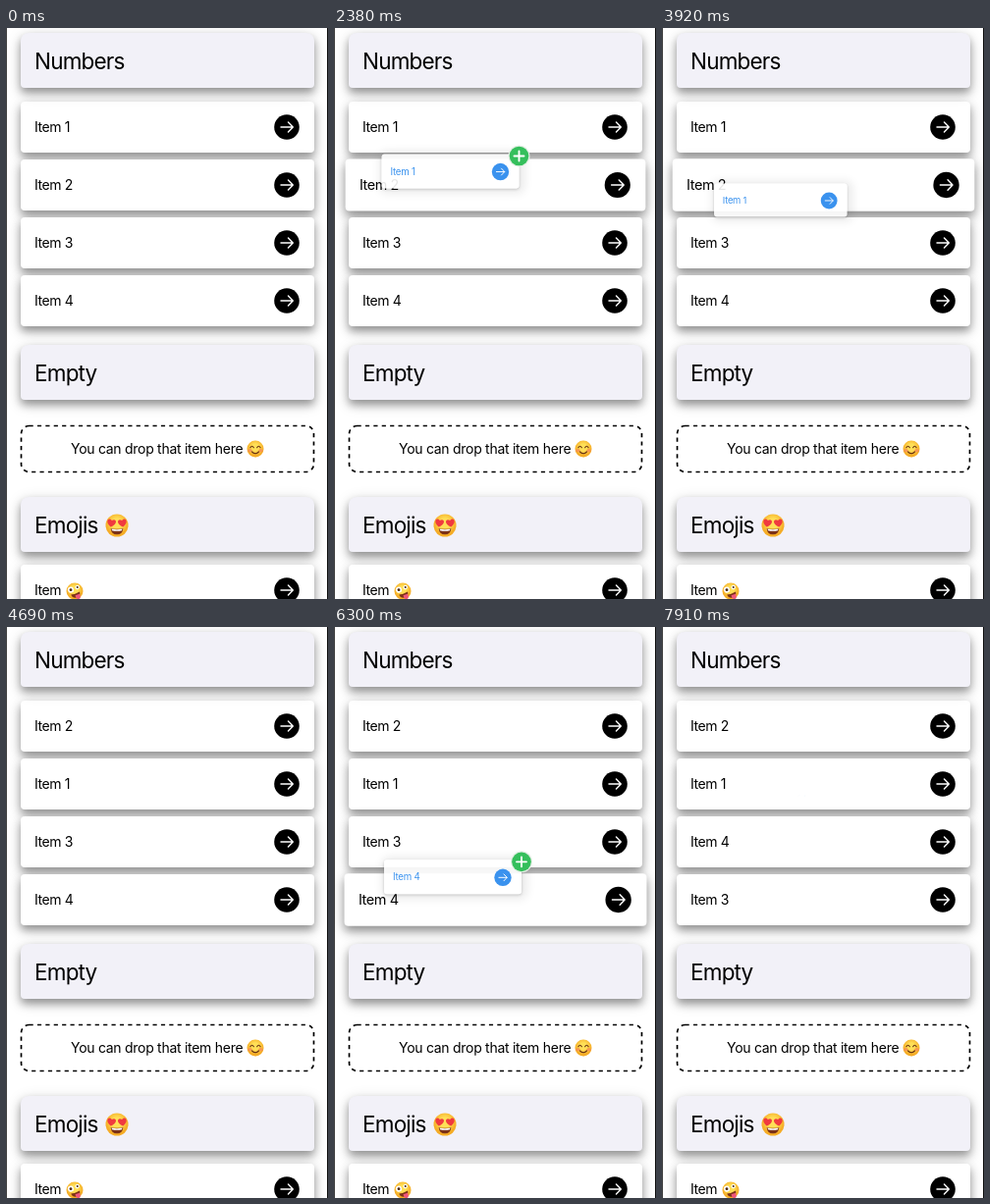
An HTML page for the animation above (8 s loop, 328 px wide and 582 px high).

```html
<!DOCTYPE html>
<html lang="en">
<head>
<meta charset="utf-8">
<title>Drag and drop list</title>
<style>
  html, body { margin: 0; width: 100%; height: 100%; overflow: hidden; background: #fff; }
  #stage { position: relative; width: 328px; height: 582px; overflow: hidden; background: #fff;
    font: 14px/52px Inter, Roboto, sans-serif; letter-spacing: -.4px; color: #000; }
  #stage div { position: absolute; box-sizing: border-box; white-space: pre; }
  svg { position: absolute; overflow: visible; }
  .card { left: 15px; width: 299px; height: 52px; padding-left: 14px; border-radius: 4px; background: #fff;
    box-shadow: 0 5px 9px rgba(0,0,0,.35), 0 4px 16px rgba(0,0,0,.16); }
  .header { height: 56px; border-radius: 8px 8px 4px 4px; background: #f2f1f8;
    font-size: 22.5px; line-height: 58px; letter-spacing: -.8px; }
  #stage .drop { left: 15px; top: 405px; width: 299px; height: 48px; padding-left: 51px;
    line-height: 48px; letter-spacing: -.28px; }
  .preview { width: 140px; height: 35px; padding-left: 9px; border-radius: 3px; background: rgba(255,255,255,.9);
    color: #3a92ee; font-size: 9.7px; line-height: 35px; letter-spacing: -.25px;
    box-shadow: 0 1px 3px rgba(0,0,0,.2), 2px 1px 10px 4px rgba(0,0,0,.08); }
  .edge { top: 0; width: 1px; height: 582px; background: #444; }
</style>
</head>
<body>
<div id="stage"></div>
<script>
const stage = document.getElementById('stage');

function add(className, html, top = 0) {
  const el = document.createElement('div');
  el.className = className;
  el.innerHTML = html;
  el.style.top = top + 'px';
  return stage.appendChild(el);
}

const svg = (x, y, scale, body) =>
  `<svg width="1" height="1" style="left:${x}px;top:${y}px"><g transform="scale(${scale})">${body}</g></svg>`;
const stroke = (d, color, width) =>
  `<path d="${d}" fill="none" stroke="${color}" stroke-width="${width}" stroke-linecap="round" stroke-linejoin="round"/>`;
const arrow = (x, y, scale = 1, color = '#000') => svg(x, y, scale,
  `<circle r="12.8" fill="${color}"/>` + stroke('M-6 0H6M1.5 -5L6.3 0L1.5 5', '#fff', 1.4));

// Faces are drawn in a circle of radius 10.
const face = (x, y, scale, features, tilt = 0) => svg(x, y, scale,
  `<defs><radialGradient id="skin" cy=".4"><stop offset=".4" stop-color="#ffdf57"/><stop offset="1" stop-color="#f5ac25"/></radialGradient></defs>
   <circle r="10" fill="url(#skin)"/><g transform="rotate(${tilt})">${features}</g>`);
const heart = x => `<path transform="translate(${x} -2.6) rotate(${-2 * x}) scale(.82)" d="M0 4.8C-8 0 -4 -6 0 -2.2C4 -6 8 0 0 4.8Z" fill="#f03a3f"/>`;
const eye = (x, y, r, pupil) => `<circle cx="${x}" cy="${y}" r="${r}" fill="#fff"/><circle cx="${x}" cy="${y}" r="${pupil}" fill="#4a2a16"/>`;
const cheek = x => `<ellipse cx="${x}" cy="2" rx="2.6" ry="1.9" fill="#f58a5a" opacity=".75"/>`;
const grin = '<path d="M-5.5 2.5Q0 4 5.5 2.5Q5 8 0 8Q-5 8 -5.5 2.5Z" fill="#7b3218"/>';
const heartEyes = (x, y) => face(x, y, 1.15, heart(-4.8) + heart(4.8) + grin + '<path d="M-4.8 3Q0 4.4 4.8 3L4.3 4.6Q0 5.6 -4.3 4.6Z" fill="#fff"/>');
const blush = (x, y) => face(x, y, .85, cheek(-6.5) + cheek(6.5) +
  stroke('M-6 -1.5Q-4 -5 -2 -1.5M2 -1.5Q4 -5 6 -1.5M-4 3.5Q0 7.5 4 3.5', '#6b3514', 1.4));
const zany = (x, y) => face(x, y, .85, eye(-4, -3, 3.6, 1.7) + eye(4.5, -3.5, 2.6, 1.2) + grin +
  '<path d="M-1 5H4.5V8.5Q3.5 11 1.5 10.5Q-1 10 -1 7Z" fill="#f0567a"/>', -18);

const slotTop = slot => 75 + 59 * slot;
const row = (label, top) => add('card', label + arrow(271, 26), top);

add('card header', 'Numbers', 5);
const rows = [1, 2, 3, 4].map(n => row('Item ' + n, 0));
add('card header', 'Empty', 323);
add('drop', `<svg width="299" height="48" style="left:0;top:0"><rect x=".5" y=".5" width="298" height="47" rx="8"
  fill="none" stroke="#000" stroke-width="1.7" stroke-dasharray="4.2"/></svg>You can drop that item here` + blush(239, 24), 405);
add('card header', 'Emojis' + heartEyes(97.5, 29), 478);
row('Item ' + zany(55, 26.5), 547);

const platter = row('<span></span>');
const preview = add('preview', '<span></span>' + arrow(121, 17.5, .68, '#3a92ee') +
  svg(139.5, 1.5, 1, '<circle r="11" fill="#e4efe5"/><circle r="9.8" fill="#35bf5c"/>' + stroke('M-5 0H5M0 -5V5', '#fff', 1.9)));
const badge = preview.lastElementChild;
platter.style.zIndex = preview.style.zIndex = 1;
add('edge', '').style.left = '0';
const rightEdge = add('edge', '');
rightEdge.style.left = '327px';
rightEdge.style.background = '#111';

const clamp = v => Math.min(1, Math.max(0, v));
const ramp = (t, start, length) => {
  const p = clamp((t - start) / length);
  return p * p * (3 - 2 * p);
};
const mix = (a, b, p) => a + (b - a) * p;

// path: time and centre of the dragged preview
const drags = [
  { item: 0, lift: 1520, liftTime: 350, morph: 2000, drop: 3880, gone: 4360,
    path: [[2000, 164.5, 101], [2220, 126, 124], [2380, 118.5, 146], [2800, 119, 166], [3080, 119.5, 167], [3360, 120, 175.5]] },
  { item: 3, lift: 5790, liftTime: 260, morph: 6070, drop: 7450, gone: 7930,
    path: [[6070, 164.5, 278], [6300, 121, 255], [6580, 120.5, 206], [6800, 119, 172]] },
];
// item, start and end of being the drop target
const targets = [[0, 1980, 2090], [1, 2190, 3890], [3, 6010, 6370], [2, 6370, 6580], [0, 6580, 7470]];
const swaps = [[0, 1, 3990], [2, 3, 7560]];

function follow(path, t) {
  let i = 0;
  while (i < path.length - 2 && t > path[i + 1][0]) i++;
  const [a, b] = [path[i], path[i + 1]];
  const p = clamp((t - a[0]) / (b[0] - a[0]));
  return [mix(a[1], b[1], p), mix(a[2], b[2], p)];
}

function drawRows(t) {
  const slots = [0, 1, 2, 3];
  const scales = [1, 1, 1, 1];
  for (const [a, b, start] of swaps) {
    const p = ramp(t, start, 320);
    slots[a] += p;
    slots[b] -= p;
  }
  for (const [item, on, off] of targets) scales[item] += .03 * (ramp(t, on, 280) - ramp(t, off, 280));
  rows.forEach((el, i) => {
    el.style.transform = `translateY(${slotTop(slots[i])}px) scale(${scales[i]})`;
    el.style.zIndex = Math.round(slots[i]) - 4;
  });
}

function drawDrag(t) {
  const drag = drags.find(d => t >= d.lift && t < d.gone);
  platter.style.opacity = preview.style.opacity = 0;
  if (!drag) return;
  for (const el of [platter, preview]) el.firstElementChild.textContent = 'Item ' + (drag.item + 1);

  const [x, y] = follow(drag.path, t);
  const morph = ramp(t, drag.morph, 230);
  const lifted = 1 + .04 * ramp(t, drag.lift, drag.liftTime);
  platter.style.opacity = 1 - morph;
  platter.style.transform = `translate(${x - 164.5}px, ${y - 26}px) scale(${mix(lifted, .47, morph)})`;

  const p = clamp((t - drag.drop) / (drag.gone - drag.drop));
  const scale = mix(2.2, 1, morph) * (1 - p ** 1.4);
  preview.style.opacity = morph * (1 - p ** 3);
  preview.style.transformOrigin = (p > 0 ? 95 : 70) + 'px 17.5px';
  preview.style.transform = `translate(${x - 70}px, ${y - 17.5}px) scale(${scale})`;
  badge.style.opacity = p > 0 ? 0 : ramp(t, drag.morph + 150, 80);
}

stage.style.zIndex = 0;

function frame() {
  const t = performance.now() % 8000;
  drawRows(t);
  drawDrag(t);
  requestAnimationFrame(frame);
}
frame();
</script>
</body>
</html>
```
